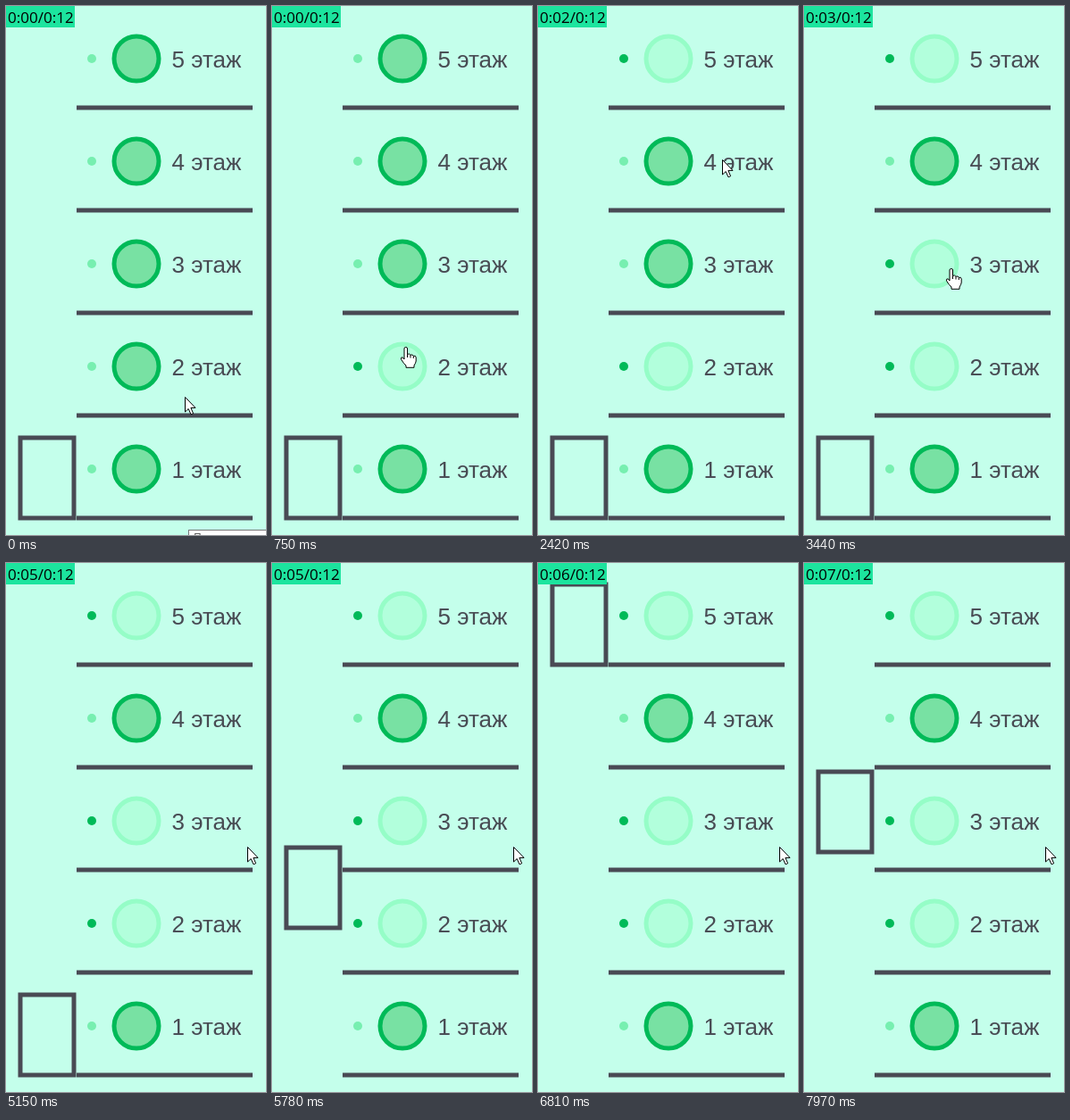
An HTML page for the animation above (8000 ms loop, 291x593 px).

```html
<!DOCTYPE html>
<html lang="ru">
<head>
<meta charset="utf-8">
<title>Лифт</title>
<style>
  html, body { margin: 0; width: 100%; height: 100%; overflow: hidden; background: #c4ffeb; }
  svg { display: block; }
  .line { stroke: #494a54; stroke-width: 5; fill: none; }
  .label { font: 26px "Liberation Sans", Arial, sans-serif; fill: #484b53; }
  .button { fill: #78e1a3; stroke: #00ba58; stroke-width: 5; }
  .dot { fill: #77efb0; }
  .called .button { fill: #b2ffdc; stroke: #95fdc7; }
  .called .dot { fill: #00ba58; }
  .timer { font: 17px "Open Sans", "Noto Sans", sans-serif; }
  .tip { font: 12px "Open Sans", "Noto Sans", sans-serif; fill: #575757; }
  .cursor { fill: #fff; stroke: #000; stroke-linejoin: round; }
</style>
</head>
<body>
<svg width="291" height="593" viewBox="0 0 291 593">
  <g id="floors"></g>
  <rect id="lift" class="line" x="16" y="-90" width="60" height="90"/>
  <rect width="77" height="24" fill="#1ce49e"/>
  <text id="timer" class="timer" x="2" y="18.5"></text>
  <g id="tip">
    <rect x="204.5" y="587.5" width="100" height="20" fill="#fff" stroke="#767676"/>
    <text class="tip" x="210" y="600">Перемотка</text>
  </g>
  <path id="arrow" class="cursor" d="M.5 .5V17L4.2 13.5L7 19.8L9.6 18.7L6.9 12.4H12Z"/>
  <path id="hand" class="cursor" d="M-2 14V2Q-2 .5-.2 .5T1.5 2V8.5Q3.6 7 5 9.3Q7.3 8 8.3 10.3Q11 9.5 11.2 12V16Q11 18 9 21V23.3H0V21Q-2.5 19-5.4 14.2Q-6.2 11.5-3.8 11.8ZM1.5 8.5V12M5 9.3V12.5M8.3 10.3V13"/>
</svg>
<script>
const LOOP = 8000;
const REFRESH = 68.7;
const SECOND = 1030;
const STOREY = 115;

const floors = [5, 4, 3, 2, 1];
const calledAt = { 2: 620, 5: 1870, 3: 3170 };
const floorY = n => 574 - (n - 1) * STOREY;

// Each move bends toward its control point "via"
const home = [200, 438];
const moves = [
  { from: 70, until: 420, via: [185, 415], to: [145, 387] },
  { from: 690, until: 1680, via: [335, 206], to: [167, 60] },
  { from: 1930, until: 2900, via: [250, 175], to: [157, 292] },
  { from: 3340, until: 3930, via: [214, 307], to: [270, 318] }
];

const $ = id => document.getElementById(id);
const ramp = (t, a, b) => Math.min(1, Math.max(0, (t - a) / (b - a)));
const ease = k => k * k * (3 - 2 * k);
const place = (id, x, y) => $(id).setAttribute('transform', `translate(${Math.round(x)} ${Math.round(y)})`);
const show = (id, on) => $(id).setAttribute('visibility', on ? 'visible' : 'hidden');

$('floors').innerHTML = floors.map(n => `
  <g id="floor${n}" transform="translate(0 ${floorY(n)})">
    <path class="line" d="M79 0H276"/>
    <circle class="dot" cx="96" cy="-55" r="5"/>
    <circle class="button" cx="146" cy="-55" r="25"/>
    <text class="label" x="185.5" y="-45">${n} этаж</text>
  </g>`).join('');

function cursorAt(t) {
  return moves.reduce((start, { from, until, via, to }) => {
    const u = ease(ramp(t, from, until)), v = 1 - u;
    return start.map((s, i) => v * v * s + 2 * u * v * via[i] + u * u * to[i]);
  }, home);
}

// Up four storeys, a pause, then down two
function liftY(t) {
  const storeys = 4 * ramp(t, 5197, 6797) - 2 * ramp(t, 7240, 8040);
  return floorY(1 + storeys);
}

function render(time) {
  const t = Math.floor(time / REFRESH + 0.15) * REFRESH;
  const [x, y] = cursorAt(t);
  const over = floors.some(n => Math.hypot(x - 146, y - floorY(n) + 55) < 28);

  for (const n of floors) $('floor' + n).classList.toggle('called', t + 10 >= calledAt[n]);
  place('lift', 0, liftY(t));
  place('arrow', x, y);
  place('hand', x, y);
  show('arrow', !over);
  show('hand', over);
  show('tip', t < REFRESH);
  $('timer').textContent = `0:0${Math.floor((t + 10) / SECOND)}/0:12`;
}

const began = performance.now();
function frame() {
  render((performance.now() - began) % LOOP);
  requestAnimationFrame(frame);
}
frame();
</script>
</body>
</html>
```
